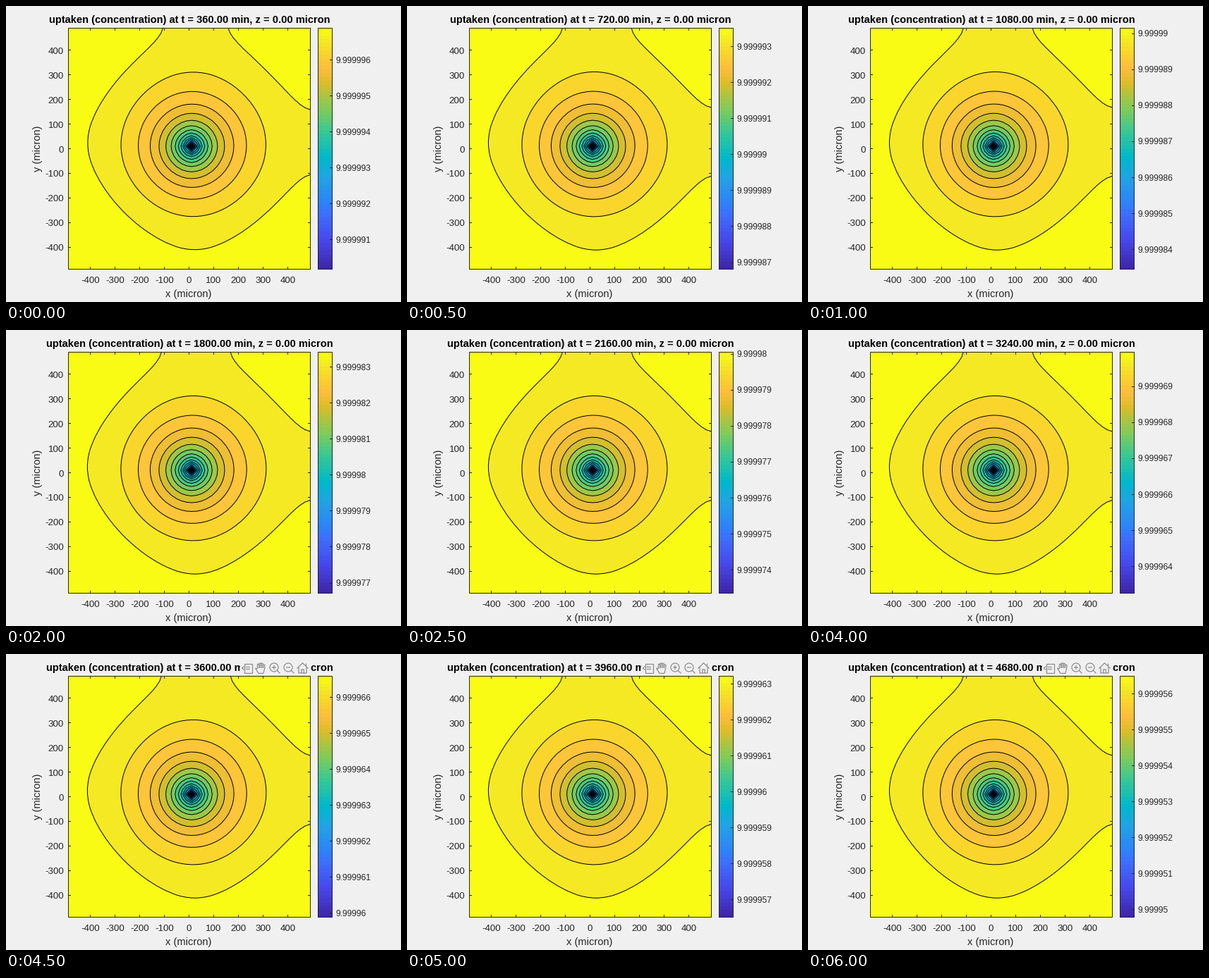
A matplotlib script that plays this animation: 560x420 px, repeating every 6500 ms.

```python
import numpy as np
import matplotlib.pyplot as plt
from matplotlib.animation import FuncAnimation
from matplotlib.colors import LinearSegmentedColormap
from matplotlib.patches import Circle, Polygon, Rectangle

W, H, DPI = 560, 420, 100
FRAMES, INTERVAL = 13, 500
PX = 72 / DPI                      # points per pixel
BG, INK, ICON = "#f0f0f0", "#262626", "#8a8a8a"

LEFT, RIGHT, TOP, BOTTOM = 88, 431, 31.5, 373.5
BAR_L, BAR_R = 442, 462
BAR_RANGE = 6.70                   # colour bar span, in 1e-6
N, CELL, HALF = 50, 25, 490        # grid size, sink index, half width
LEVELS = 20
SPLIT = 0.06                       # smoothing by the split time step

plt.rcParams["font.family"] = "Liberation Sans"

KEYS = {0: "#3e26a8", 7: "#4747eb", 14: "#3e6fff", 17: "#2f81fa",
        24: "#20a5e3", 29: "#01b8ca", 36: "#37c897", 42: "#81cc59",
        49: "#dcbd29", 53: "#febe3d", 57: "#fad62d", 60: "#f5e924",
        63: "#f9fb15"}
CMAP = LinearSegmentedColormap.from_list(
    "blue_yellow", [(i / 63, c) for i, c in KEYS.items()])
PALETTE = CMAP(np.linspace(0, 1, 64))
BANDS = [PALETTE[min(63, 64 * (i + 1) // LEVELS)] for i in range(LEVELS)]

# Cosine modes of diffusion in a closed box
order = np.arange(N)
MODES = np.cos(np.pi * np.outer(order + .5, order) / N) * np.sqrt(2 / N)
MODES[:, 0] = np.sqrt(1 / N)
lam = 2 - 2 * np.cos(np.pi * order / N)
LAM = np.add.outer(lam, lam) + SPLIT * np.outer(lam, lam)
LAM[0, 0] = 1
AXIS = np.linspace(-HALF, HALF, N)


def field(minutes):
    """Concentration around one steady sink, relative to the mean."""
    weight = (1 - np.exp(-2.5 * LAM * minutes)) / LAM
    weight[0, 0] = 0
    weight *= np.outer(MODES[CELL], MODES[CELL])
    return -MODES @ weight @ MODES.T


fig = plt.figure(figsize=(W / DPI, H / DPI), dpi=DPI, facecolor=BG)
plot = fig.add_axes([LEFT / W, 1 - BOTTOM / H,
                     (RIGHT - LEFT) / W, (BOTTOM - TOP) / H])
plot.axis("off")
page = fig.add_axes([0, 0, 1, 1])
page.axis("off")


def pixel(v):
    """Centre of the pixel that holds v."""
    return np.floor(v) + .5


def line(xs, ys, color=INK, width=1, z=3):
    return page.plot(xs, ys, color=color, lw=width * PX, zorder=z,
                     solid_capstyle="butt", snap=False)[0]


def text(x, y, s, size, color=INK, ha="center", **kw):
    return page.text(x, y, s, fontsize=size * PX, color=color, ha=ha,
                     va="baseline", zorder=4, **kw)


def frame_box(x0, x1):
    x0, x1, y0, y1 = map(pixel, (x0, x1, TOP, BOTTOM))
    page.add_patch(Rectangle((x0, y0), x1 - x0, y1 - y0, fill=False, ec=INK,
                             lw=PX, zorder=3, snap=False))


def draw_axes():
    frame_box(LEFT, RIGHT)
    cx, cy = (LEFT + RIGHT) / 2, (TOP + BOTTOM) / 2
    for v in range(-400, 401, 100):
        x = cx + v * (RIGHT - LEFT) / (2 * HALF)
        y = cy - v * (BOTTOM - TOP) / (2 * HALF)
        for edge, step in ((BOTTOM, -3.5), (TOP, 3.5)):
            line([pixel(x)] * 2, [edge, edge + step])
        for edge, step in ((LEFT + .5, 3.5), (RIGHT + .5, -3.5)):
            line([edge, edge + step], [pixel(y)] * 2)
        text(x, 393, str(v), 13.33)
        text(82, y + 5, str(v), 13.33, ha="right")
    text(cx - .5, 413, "x (micron)", 14.67)
    text(49, cy, "y (micron)", 14.67, rotation=90, rotation_mode="anchor")


def draw_bar():
    page.imshow(PALETTE[::-1, None], aspect="auto", interpolation="nearest",
                extent=(BAR_L, BAR_R + 1, BOTTOM + .5, TOP - .5), zorder=1)
    frame_box(BAR_L, BAR_R)


def draw_toolbar():
    """Grey tool icons that cover the end of the title."""
    parts = [page.add_patch(Rectangle((331.5, 11), 99.5, 19, fc=BG, ec="none",
                                      zorder=6))]

    def stroke(xs, ys):
        parts.append(line(xs, ys, ICON, 1.2, 7))

    def outline(shape):
        shape.set(fill=False, edgecolor=ICON, linewidth=1.2 * PX, zorder=7)
        parts.append(page.add_patch(shape))

    # data tip
    outline(Rectangle((337.5, 13.5), 11, 13))
    stroke([337.5, 334.5, 337.5], [17.5, 20, 22.5])
    for y in (18.5, 21.5):
        stroke([340, 346], [y, y])

    # hand
    for i in range(4):
        x, tip = 356.5 + 2.7 * i, 13 + .8 * (i - 1.3) ** 2
        stroke([x, x, x + 2.2, x + 2.2], [20, tip, tip, 20])
    outline(Polygon([(357, 21), (353.5, 20), (358, 27.5), (364.8, 27.5),
                     (366.8, 20)], closed=False))

    # zoom in and out
    for cx in (380, 400):
        outline(Circle((cx, 19), 6))
        stroke([cx - 3, cx + 3], [19, 19])
        stroke([cx + 4.3, cx + 8.5], [23.3, 27.5])
    stroke([380, 380], [16, 22])

    # home
    stroke([412.5, 420.5, 428.5], [20.5, 12.8, 20.5])
    stroke([415, 415, 426, 426], [18.5, 27, 27, 18.5])
    stroke([418.8, 418.8, 422.2, 422.2], [27, 22, 22, 27])
    stroke([425.5, 425.5], [13.5, 17])
    return parts


draw_axes()
draw_bar()
title = text(260, 24, "", 14.67, "black", weight="bold")
toolbar = draw_toolbar()
page.set(xlim=(0, W), ylim=(H, 0))
bar_marks = []


def draw_contours(k):
    for old in list(plot.collections):
        old.remove()
    c = field(360 * (k + 1))
    edges = np.linspace(c.min(), c.max(), LEVELS + 1)
    plot.contourf(AXIS, AXIS, c.T, levels=edges + 1e-6 * (edges > 0),
                  colors=BANDS, antialiased=False)
    plot.contour(AXIS, AXIS, c.T, levels=edges[1:-1], colors="black",
                 linewidths=PX, linestyles="solid")
    plot.set(xlim=(-HALF, HALF), ylim=(-HALF, HALF))


def draw_bar_marks(k):
    while bar_marks:
        bar_marks.pop().remove()
    top = 3.12 + 3.366 * k         # shortfall from 10 at the top, in 1e-6
    for m in range(int(np.ceil(top)), int(top + BAR_RANGE) + 1):
        y = TOP + (m - top) * (BOTTOM - TOP) / BAR_RANGE
        bar_marks.append(line([BAR_R - 3, BAR_R + .5], [pixel(y)] * 2))
        bar_marks.append(text(468, y + 4.3, f"{10 - m * 1e-6:.7g}", 12,
                              ha="left"))


def update(k):
    draw_contours(k)
    draw_bar_marks(k)
    title.set_text(f"uptaken (concentration) at t = {360 * (k + 1):.2f} min, "
                   "z = 0.00 micron")
    for part in toolbar:
        part.set_visible(k >= 9)
    return []


anim = FuncAnimation(fig, update, frames=FRAMES, interval=INTERVAL,
                     init_func=lambda: update(0), repeat=True, repeat_delay=0)
plt.show()
```
